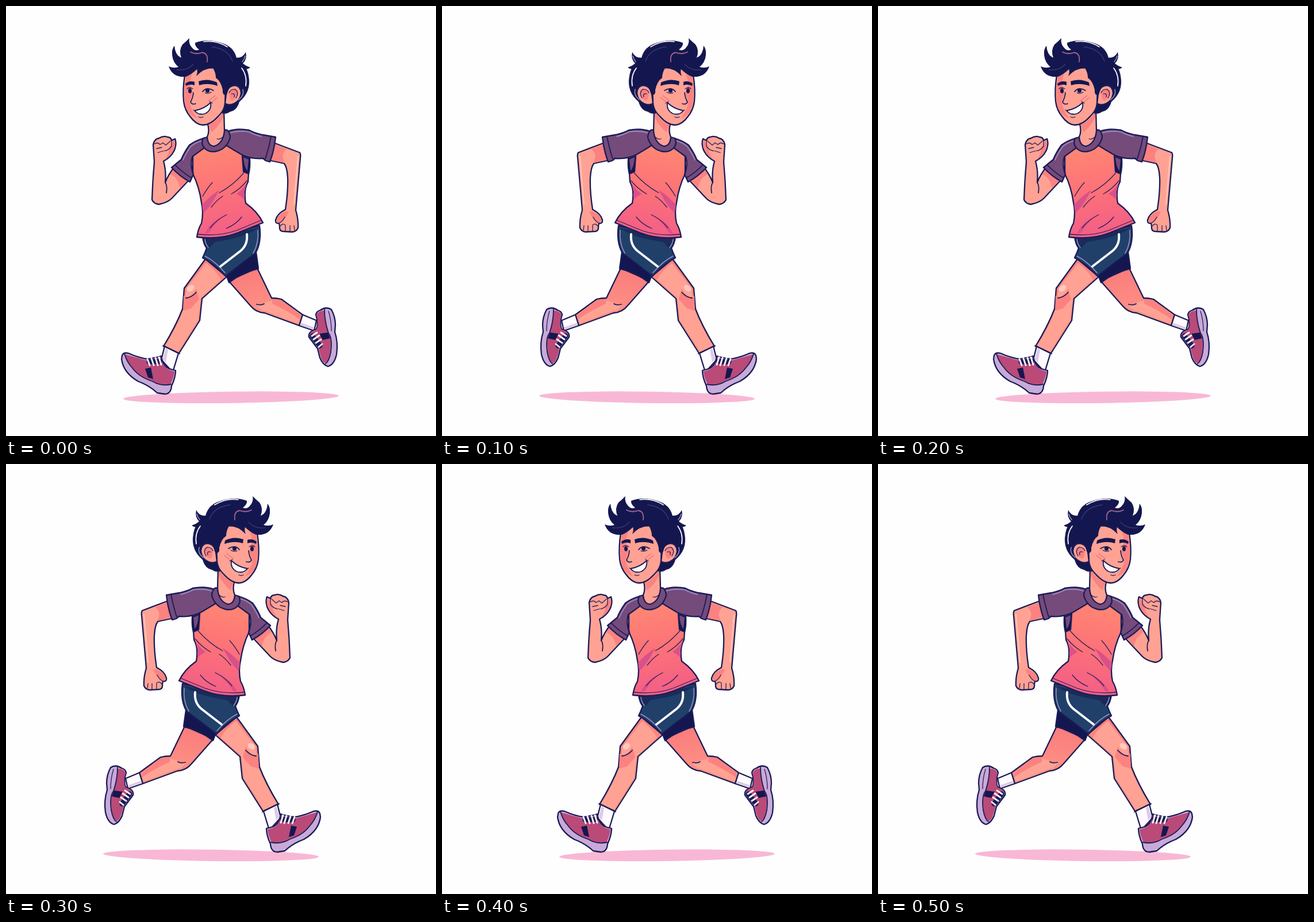
Animation of 748x748 px, one loop 600 ms. Source, as an HTML page:

```html
<!DOCTYPE html>
<html lang="en">
<head>
<meta charset="utf-8">
<title>Runner</title>
<style>
  html, body { margin: 0; width: 100%; height: 100%; overflow: hidden; background: #fefefe; }
  svg { display: block; width: 100vw; height: 100vh; }
  path { stroke-linecap: round; stroke-linejoin: round; }
  .ink { stroke: #1a1b57; stroke-width: 2.3; }
  .line { fill: none; stroke: #1a1b57; stroke-width: 1.8; }
  .thin { fill: none; stroke: #2a2259; stroke-width: 1.3; }
  .shine { fill: none; stroke: #9a93c4; stroke-width: 1.5; }
  .glow { fill: none; stroke: #ffc9bc; stroke-width: 1.8; }
  .skin { fill: #ffa294; }
  .blush { fill: #fb8280; }
  .navy { fill: #14174f; }
  .shorts { fill: #20406a; }
  .sleeve { fill: #754b7b; }
  .shoe { fill: #ba4a78; }
  .sole { fill: #c8aad8; }
  .white { fill: #fffafd; }
  .sock-shade { fill: #dccbe8; }
  .lace-bed { fill: none; stroke: #1a1b57; stroke-width: 9; }
  .lace { fill: none; stroke: #fffafd; stroke-width: 2.8; }
</style>
</head>
<body>
<svg viewBox="0 0 748 748">
  <defs>
    <linearGradient id="shirt" x1="0.4" y1="0" x2="0.55" y2="1">
      <stop offset="0" stop-color="#ff8a72"/>
      <stop offset="0.5" stop-color="#fd7278"/>
      <stop offset="1" stop-color="#f25d87"/>
    </linearGradient>
    <linearGradient id="thigh" x1="0" y1="0" x2="0.3" y2="1">
      <stop offset="0" stop-color="#f9797a"/>
      <stop offset="1" stop-color="#ff9688"/>
    </linearGradient>
  </defs>

  <g id="runner">
    <ellipse cx="391.5" cy="680.7" rx="187.5" ry="10" fill="#f8b8d5" transform="rotate(-0.8 391.5 680.7)"/>

    <g id="back-leg">
      <path class="ink" fill="url(#thigh)" d="M387 478 L424 520 Q434 533 450 534 L510 556 L516 537 L479 510 Q471 508 462 508 L437 456 Z"/>
      <path class="skin" d="M436 521 Q450 516 464 512 L478 513 L512 538 L509 552 L453 531 Q442 530 436 521 Z"/>
      <path class="blush" d="M463 510 L478 512 L513 538 L511 545 Q488 529 463 518 Z"/>
      <path class="line" d="M436 519 Q444 521 449 518"/>
      <path class="ink white" d="M516 537 L540 547 L536 565 L510 556 Z"/>
      <path class="sock-shade" d="M513 551 L536 559 L535 563 L512 555 Z"/>
      <path class="ink sole" d="M539 537 Q540 531 547 529 Q557 522 566 528 Q573 541 573 555 L572 567 Q578 585 575 606 Q571 624 560 627 Q551 624 546 612 L542 596 L527 576 Q525 566 540 562 Q544 553 539 537 Z"/>
      <path class="shoe" d="M540 537 Q545 529 554 530 Q554 549 561 569 Q567 577 564 602 Q562 617 555 621 Q550 619 547 608 L543 594 L528 574 Q528 567 540 563 Q545 553 540 537 Z"/>
      <path class="line" d="M554 528 Q554 548 561 569 Q568 577 565 602 Q562 618 556 622"/>
      <path class="navy" d="M545 570 L560 568 L564 578 L551 581 Z"/>
      <path class="thin" d="M561 531 Q566 547 566 565"/>
      <path class="lace-bed" d="M533 574 L546 591"/>
      <path class="lace" d="M532 574 L541 568 M535 580 L545 573 M539 586 L548 580 M544 593 L550 588"/>
    </g>

    <g id="front-leg">
      <path class="ink" fill="url(#thigh)" d="M347 440 L310 491 L307 527 Q296 556 274 592 L301 604 L337 547 L341 509 L384 471 Z"/>
      <path class="skin" d="M348 447 L314 491 L309 527 Q298 557 277 591 L299 601 L334 547 L339 508 L374 476 Q365 459 348 447 Z"/>
      <path class="blush" d="M309 504 Q320 512 331 492 L336 510 L322 526 L308 530 Z"/>
      <ellipse cx="321" cy="491" rx="7" ry="5" fill="#ffc9be" transform="rotate(-35 321 491)"/>
      <path class="line" d="M313 508 Q323 507 331 498"/>
      <path class="ink white" d="M276 592 L300 604 L290 637 L270 615 Z"/>
      <path class="sock-shade" d="M278 595 L282 598 L278 620 L272 614 Z"/>
      <path class="line" d="M273 591 L302 605"/>
      <path class="ink sole" d="M202 608 Q204 602 213 604 Q231 612 246 614 Q260 612 270 609 Q273 627 284 631 L295 634 Q295 646 288 661 Q287 675 276 675 L263 673 Q249 660 230 653 Q204 638 201 614 Z"/>
      <path class="shoe" d="M207 606 Q224 611 243 616 Q258 614 269 611 Q272 628 284 633 L293 636 Q292 646 286 658 Q269 661 255 652 Q231 644 220 630 Q210 619 207 606 Z"/>
      <path class="line" d="M206 605 Q210 619 220 630 Q231 645 255 653 Q270 662 287 658"/>
      <path class="navy" d="M242 631 L252 629 L256 649 L247 646 Z"/>
      <path class="lace-bed" d="M249 619 L267 618"/>
      <path class="lace" d="M246 614 L250 625 M253 613 L257 625 M260 612 L264 625 M266 611 L270 624"/>
    </g>

    <g id="shorts">
      <path class="ink navy" d="M381 463 L435 428 L439 457 Q412 463 388 481 Z"/>
      <path class="ink shorts" d="M342 402 Q344 415 349 421 Q346 430 342 438 Q363 449 382 470 Q407 450 434 430 Q445 411 441 382 Z"/>
      <path fill="#1a2b5a" d="M344 405 L440 386 Q421 398 398 404 Q374 409 363 411 L354 421 Q347 417 344 405 Z"/>
      <path class="shine" d="M346 406 Q347 414 352 420 M346 435 Q364 444 381 464 M438 390 Q440 413 430 430"/>
      <path fill="none" stroke="#fffafd" stroke-width="4" d="M373 453 L408 426 Q421 415 419 397"/>
    </g>

    <g id="front-arm">
      <path class="ink skin" d="M292 281 Q282 294 277 307 Q279 287 274 270 Q289 262 294 248 Q297 238 294 231 L288 234 Q287 228 281 228 Q274 225 266 230 Q258 231 256 241 L258 271 Q255 305 254 337 Q257 344 266 345 Q281 342 288 335 L319 302 Z"/>
      <path class="blush" d="M292 284 L316 302 L303 317 Q300 300 286 292 Z"/>
      <path class="line" d="M277 307 Q281 313 279 325"/>
      <path class="blush" d="M284 246 L290 236 L293 234 Q295 245 291 251 Q286 261 276 267 Q285 257 284 246 Z"/>
      <path class="thin" d="M258 240 Q264 236 268 241 L273 238 L278 242 L286 235 M262 248 L271 246 M264 255 L274 252 M288 234 L288 244 Q283 251 276 252"/>
    </g>

    <g id="back-arm">
      <path class="ink skin" d="M466 238 L511 255 Q513 258 512 264 L504 355 Q509 372 508 386 Q505 393 497 393 L481 392 Q475 391 476 383 L475 378 Q468 379 469 372 Q472 361 486 354 Q491 322 490 298 Q489 281 484 274 L456 268 Z"/>
      <path class="blush" d="M465 240 L488 249 Q477 258 485 273 L458 267 Z"/>
      <path class="blush" d="M487 357 L492 358 Q487 370 477 377 Q470 377 471 371 Q475 362 487 357 Z"/>
      <path class="glow" d="M508 262 L501 345"/>
      <path class="thin" d="M475 378 Q482 374 485 367 M477 383 Q481 377 486 381 M486 382 L486 391 M494 382 L494 392 M501 382 L502 390"/>
    </g>

    <g id="torso">
      <path class="ink" fill="url(#shirt)" d="M344 235 L325 255 L325 292 Q336 314 340 342 Q344 359 340 378 Q334 388 332 402 Q370 407 402 395 L447 377 Q438 358 417 343 Q413 320 421 306 L424 263 L389 230 Z"/>
      <path fill="#d9518a" d="M341 346 Q355 330 371 320 Q361 339 353 350 Q347 357 343 360 Z"/>
      <path fill="#dc5089" d="M346 396 Q357 374 378 366 Q362 379 353 395 Z"/>
      <path fill="#dc5089" d="M401 327 Q413 318 419 307 L415 322 L415 337 Q409 331 401 327 Z"/>
      <path class="thin" d="M342 331 Q350 317 359 307 M371 325 Q395 312 414 290 M392 327 Q408 318 419 304 M357 350 Q367 337 377 331 M355 386 Q367 371 384 363 M383 387 Q400 380 410 367"/>
      <path class="thin" d="M334 397 Q372 401 402 390 L443 373"/>
      <path class="ink navy" d="M411 261 L424 266 Q425 281 422 292 L413 288 Z"/>
      <path class="sleeve" d="M413 263 L422 267 L420 287 Q414 280 413 263 Z"/>

      <path class="ink sleeve" d="M344 230 Q329 234 319 242 Q309 256 305 267 L288 281 Q303 297 320 306 L326 293 Q320 277 324 262 Q335 254 346 246 Z"/>
      <path class="shine" d="M342 234 Q328 238 321 245 Q311 260 308 268"/>
      <path class="line" d="M294 276 Q307 290 323 299"/>

      <path class="ink sleeve" d="M386 218 Q402 212 423 216 Q432 221 446 224 L469 228 Q467 250 459 271 Q448 269 448 265 Q426 267 409 258 Q397 251 384 243 Z"/>
      <path class="shine" d="M389 221 Q405 216 423 219 Q432 224 444 227"/>
      <path class="line" d="M461 227 Q457 248 451 266"/>

      <path class="ink sleeve" d="M343 230 Q338 240 346 248 Q353 255 365 253 Q384 249 390 229 Q390 221 385 216 L378 215 Q377 236 362 242 Q352 241 350 228 Z"/>
    </g>

    <g id="neck">
      <path class="ink skin" d="M350 203 Q355 216 350 228 Q351 243 362 244 Q378 239 380 217 L379 178 Z"/>
      <path class="blush" d="M352 207 Q367 202 378 184 L378 193 Q371 209 357 220 Q356 213 352 207 Z"/>
      <path class="thin" d="M367 231 Q372 233 377 228"/>
    </g>

    <g id="head">
      <path class="ink navy" d="M372 104 L404 96 Q418 103 421 122 Q426 149 405 166 Q401 181 389 183 Q384 187 377 186 L372 145 Z"/>
      <path class="ink skin" d="M311 120 Q307 145 309 166 Q311 181 320 192 Q330 206 342 207 Q356 207 369 192 Q380 182 381 169 L382 140 L371 108 L334 106 Z"/>
      <path class="blush" d="M313 122 L324 118 Q316 136 325 150 L319 167 Q323 184 333 196 Q319 190 313 178 Q308 150 313 122 Z"/>

      <path class="ink skin" d="M383 153 Q386 138 399 138 Q409 140 409 152 Q407 166 396 170 Q386 174 381 169 Z"/>
      <path class="blush" d="M389 151 Q397 141 403 147 Q404 160 393 165 Q387 160 389 151 Z"/>
      <path class="thin" d="M388 151 Q391 144 399 145 Q406 151 400 160 M392 153 Q399 151 397 158"/>

      <path class="navy" d="M313 123 Q300 124 293 119 Q286 114 283 105 Q291 109 300 106 Q290 98 289 85 Q288 75 293 69 Q294 81 300 87 L305 90 Q300 77 307 67 Q313 62 319 56 Q317 66 324 73 Q329 79 336 76 Q328 70 329 64 Q350 56 374 64 Q396 70 401 90 Q413 90 417 80 Q420 92 412 100 Q418 105 425 107 Q419 112 410 109 Q416 118 417 130 Q414 122 409 122 L407 139 Q396 134 388 142 L384 154 Q376 157 377 146 Q374 131 365 125 Q365 116 360 108 Q344 108 331 122 Q334 114 332 110 Q323 119 313 123 Z"/>
      <path fill="none" stroke="#fefefe" stroke-width="1.7" d="M410 108 Q420 121 417 139 M344 62 Q365 59 385 71"/>
      <path fill="none" stroke="#a9658c" stroke-width="1.8" d="M321 80 Q330 85 341 81 Q352 82 350 97"/>
      <path fill="none" stroke="#34396f" stroke-width="1.4" d="M358 71 Q387 75 394 96 M297 111 Q316 113 326 101"/>
      <path class="shine" d="M411 97 Q415 92 416 87 M412 145 Q415 155 405 163"/>

      <path class="navy" d="M312 135 Q320 129 328 132 L328 138 Q320 135 313 139 Z"/>
      <path class="navy" d="M335 131 Q351 125 367 133 L368 139 Q350 133 336 138 Z"/>
      <ellipse class="navy" cx="320" cy="147.5" rx="3" ry="4.2"/>
      <path class="thin" d="M315 144 Q319 140 325 144"/>
      <ellipse class="navy" cx="350.5" cy="147" rx="3.6" ry="3.8"/>
      <path class="line" d="M342 149 Q349 140 361 147"/>
      <path class="thin" d="M346 151 Q351 153 357 150"/>
      <path class="line" d="M326 151 Q325 160 321 167 Q323 172 330 170"/>
      <path class="line white" style="fill: #fffafd" d="M328 182 Q345 179 356 168 Q358 181 347 187 Q335 191 328 182 Z"/>
      <path class="thin" d="M326 181 L330 183 M354 166 L359 169 M335 193 Q339 195 343 193"/>
      <path fill="none" stroke="#f16f75" stroke-width="1.4" d="M353 164 L364 156 M358 167 L368 159"/>
    </g>
  </g>
</svg>
<script>
  const STEP = 100;
  const runner = document.getElementById("runner");
  const start = performance.now();

  // The runner turns to face the other way on every step.
  function draw(time) {
    const flipped = Math.floor(time / STEP) % 2 === 1;
    runner.setAttribute("transform", flipped ? "translate(748 0) scale(-1 1)" : "");
  }

  function tick() {
    draw(performance.now() - start);
    requestAnimationFrame(tick);
  }

  tick();
</script>
</body>
</html>
```
